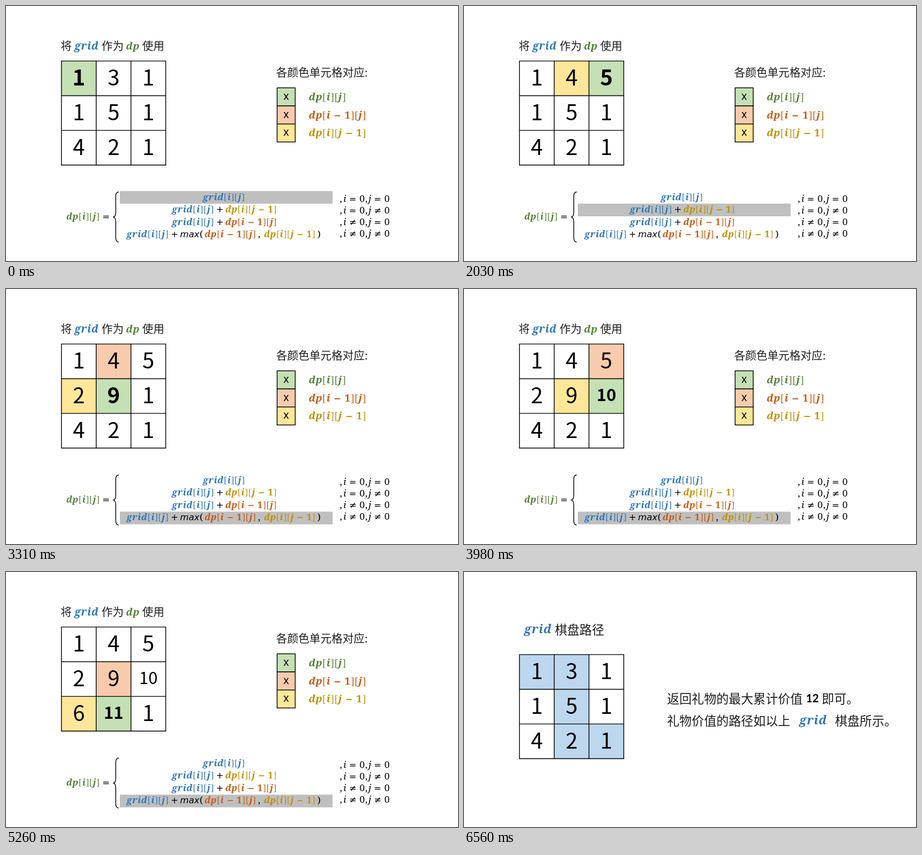
Animation, 818 px wide and 462 px high, one loop 7200 ms. Source, as an HTML page:

```html
<!DOCTYPE html>
<html lang="zh-CN">
<head>
<meta charset="utf-8">
<title>grid dp</title>
<style>
  html, body { margin: 0; width: 100%; height: 100%; overflow: hidden; background: #fff; }
  svg { display: block; width: 818px; height: 462px; }
  .cjk { font-family: "Noto Sans CJK SC Light", "Noto Sans CJK SC", "Noto Sans CJK", sans-serif; font-weight: 300; fill: #1c1c1c; }
  .num { font-family: "Noto Sans CJK SC", "Noto Sans CJK", sans-serif; text-anchor: middle; }
  .key { font-family: "Noto Sans", sans-serif; font-size: 19px; text-anchor: middle; }
  .sum { font-family: Lato, sans-serif; font-weight: 700; font-size: 20px; }
  .math { font-family: "Noto Serif", serif; font-weight: 700; font-style: italic; letter-spacing: .04em; }
  .thin { font-family: "Noto Serif", serif; font-size: 17px; text-anchor: middle; }
  .op { font-family: "DejaVu Sans", sans-serif; font-size: 16px; text-anchor: middle; }
  .bracket { font-family: "Liberation Serif", serif; font-weight: 400; font-style: normal; font-size: 1.06em; }
  .minus { font-family: "DejaVu Sans", sans-serif; font-style: normal; font-size: .9em; }
  .upright { font-style: normal; }
  .mid { text-anchor: middle; }
  .line { fill: none; stroke: #000; stroke-width: 1.4; }
</style>
</head>
<body>
<svg id="stage" viewBox="0 0 818 462"></svg>
<script>
const LOOP = 7200;
const TIMES = [0, 1390, 2030, 2690, 3310, 3980, 4600, 5260, 5900, 6560];
const GRID = [1, 3, 1, 1, 5, 1, 4, 2, 1];
const PATH = [0, 1, 4, 7, 8];
const CELL = 62.9;
const INK = { blue: '#2e75b6', green: '#548235', orange: '#c55a11', gold: '#bf9000' };
const FILL = { green: '#c5e0b4', orange: '#f8cbad', gold: '#ffe699', blue: '#bdd7ee' };
const ITEM = 'grid[i][j]', SELF = 'dp[i][j]', UP = 'dp[i − 1][j]', LEFT = 'dp[i][j − 1]';

const text = (x, y, s, cls, extra = '') => `<text x="${x}" y="${y}" class="${cls}" ${extra}>${s}</text>`;
const rect = (x, y, w, h, fill) => `<rect x="${x}" y="${y}" width="${w}" height="${h}" fill="${fill}"/>`;
const cjk = (x, y, s, size) => text(x, y, s, 'cjk', `font-size="${size}"`);
const thin = (x, y, s) => text(x, y, s, /[=≠+]/.test(s) ? 'op' : 'thin');
const italic = s => `<tspan style="font-style:italic">${s}</tspan>`;

function math(x, y, s, ink, size, mid = '') {
  const kinds = { '−': 'minus', '1': 'upright', '[': 'bracket', ']': 'bracket' };
  const body = s.replace(/[−1[\]]/g, c => `<tspan class="${kinds[c]}">${c}</tspan>`);
  return text(x, y, body, 'math ' + mid, `fill="${INK[ink]}" font-size="${size}"`);
}
const term = (x, y, s, ink) => math(x, y, s, ink, 16.4, 'mid');

function board(top, values, fills, bold) {
  const left = 100.4, size = 3 * CELL;
  let out = '', lines = '';
  values.forEach((v, k) => {
    const x = left + k % 3 * CELL, y = top + Math.floor(k / 3) * CELL;
    const wide = v > 9;
    if (fills[k]) out += rect(x, y, CELL, CELL, fills[k]);
    out += text(x + CELL / 2, y + CELL / 2 + (wide ? 9 : 12.8), v, 'num',
      `font-size="${wide ? 30 : 39}" font-weight="${k === bold ? 700 : 400}"`);
  });
  for (let n = 0; n < 4; n++) {
    const d = n * CELL;
    lines += `M${left - .7} ${top + d}h${size + 1.4}M${left + d} ${top}v${size}`;
  }
  return out + `<path class="line" d="${lines}"/>`;
}

function legend() {
  const rows = [[SELF, 'green'], [UP, 'orange'], [LEFT, 'gold']];
  return cjk(489, 127.5, '各颜色单元格对应:', 20) + rows.map(([s, ink], n) => {
    const y = 148.3 + n * 32.7;
    return `<rect x="490.6" y="${y}" width="32.8" height="32.7" class="line" style="fill:${FILL[ink]}"/>`
      + text(507, y + 21.7, 'x', 'key') + math(547.8, y + 22.5, s, ink, 18.3);
  }).join('');
}

function formula(active) {
  const y = [352, 374.3, 396.5, 419];
  let out = rect(206, 335.3 + active * 22.7, 385, 23, '#bfbfbf')
    + term(139.5, 386.5, SELF, 'green') + thin(181, 387, '=')
    + '<path class="line" d="M204 337Q198.6 337 198.6 345V374Q198.6 382 193.8 382.4'
    + 'Q198.6 383 198.6 391V419Q198.6 427.6 204 427.6"/>'
    + term(394.5, y[0], ITEM, 'blue');
  [[LEFT, 'gold'], [UP, 'orange']].forEach(([s, ink], n) => {
    out += term(338.5, y[n + 1], ITEM, 'blue') + thin(387, y[n + 1], '+')
      + term(443.5, y[n + 1], s, ink);
  });
  out += term(256.5, y[3], ITEM, 'blue') + thin(305, y[3], '+')
    + thin(332.5, y[3], italic('max')) + thin(353.5, y[3], '(')
    + term(406, y[3], UP, 'orange') + thin(458, y[3], ',')
    + term(513.5, y[3], LEFT, 'gold') + thin(566.5, y[3], ')');
  for (let n = 0; n < 4; n++) {
    const ends = [[606, ','], [644.5, '0'], [652, ','], [689.5, '0']];
    const vars = [[613, 'i'], [658.5, 'j']];
    const base = 354.6 + n * 21.1;
    out += ends.map(([x, s]) => thin(x, base, s)).join('')
      + vars.map(([x, s]) => text(x, base, italic(s), 'thin')).join('')
      + thin(627.5, base, n > 1 ? '≠' : '=') + thin(672.5, base, n % 2 ? '≠' : '=');
  }
  return out;
}

function solving(step) {
  const dp = GRID.slice(), fills = [];
  for (let k = 1; k <= step; k++) {
    dp[k] += Math.max(k > 2 ? dp[k - 3] : 0, k % 3 ? dp[k - 1] : 0);
  }
  const hasUp = step > 2, hasLeft = step % 3 > 0;
  fills[step] = FILL.green;
  if (hasUp) fills[step - 3] = FILL.orange;
  if (hasLeft) fills[step - 1] = FILL.gold;
  return cjk(99, 79.5, '将', 20) + math(124, 79, 'grid', 'blue', 19) + cjk(173, 79.5, '作为', 20)
    + math(217, 79, 'dp', 'green', 18.3) + cjk(246.5, 79.5, '使用', 20)
    + board(99.6, dp, fills, step) + legend() + formula(2 * hasUp + hasLeft);
}

function answer() {
  const fills = [];
  PATH.forEach(k => fills[k] = FILL.blue);
  return math(109, 111, 'grid', 'blue', 21.7) + cjk(164.5, 112.5, '棋盘路径', 22.3)
    + board(149.6, GRID, fills)
    + cjk(367.5, 237.5, '返回礼物的最大累计价值', 22.3) + text(619, 236, '12', 'sum')
    + cjk(647.5, 237.5, '即可。', 22.3)
    + cjk(367.5, 277.5, '礼物价值的路径如以上', 22.3) + math(607, 276, 'grid', 'blue', 21.7)
    + cjk(671.5, 277.5, '棋盘所示。', 22.3);
}

const stage = document.getElementById('stage');
let shown = -1;
function draw() {
  const t = performance.now() % LOOP;
  const step = TIMES.filter(s => s <= t).length - 1;
  if (step !== shown) {
    shown = step;
    stage.innerHTML = step < 9 ? solving(step) : answer();
  }
  requestAnimationFrame(draw);
}
draw();
</script>
</body>
</html>
```
